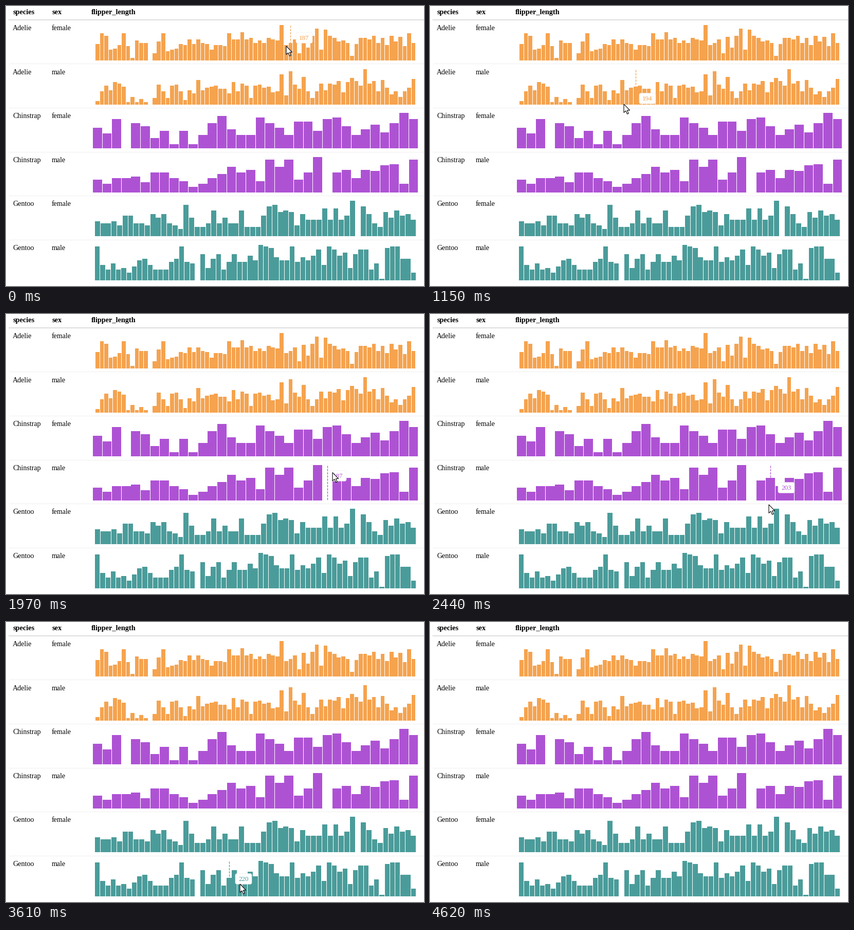
Animation, 813 px wide and 545 px high, one loop 4.68 s. Source, as a matplotlib script:

```python
import numpy as np
import matplotlib.pyplot as plt
from matplotlib.animation import FuncAnimation
from matplotlib.collections import PolyCollection
from matplotlib.patches import FancyBboxPatch, Polygon

W, H, DPI = 813, 545, 64
LOOP, INTERVAL = 4680, 30
STEPS = 69  # distinct poses per loop
PX = 72 / DPI

ORANGE, PURPLE, TEAL = "#f5a34f", "#ae52d4", "#4a9c9a"
FIRST_X, LAST_X, BAR_GAP = 177.8, 792.4, 0.9
BASE_Y, ROW_H, PLOT_H = 106, 85.6, 69
TIP_W, TIP_H = 32, 20.5

# Palmer penguins flipper lengths (mm)
adelie_female = [
    186, 195, 193, 181, 182, 185, 195, 184, 174, 189, 187, 187, 172, 178, 188,
    195, 180, 181, 182, 186, 185, 190, 186, 190, 187, 186, 181, 185, 185, 184,
    195, 190, 190, 196, 190, 191, 187, 189, 187, 191, 190, 189, 202, 185, 187,
    190, 178, 192, 183, 193, 199, 181, 198, 193, 191, 188, 189, 187, 176, 186,
    191, 191, 190, 193, 187, 191, 185, 193, 188, 192, 184, 195, 187]
adelie_male = [
    181, 190, 195, 191, 198, 197, 194, 180, 185, 180, 183, 180, 178, 184, 196,
    190, 184, 195, 196, 190, 182, 191, 188, 200, 191, 193, 194, 195, 192, 192,
    188, 198, 190, 197, 195, 184, 195, 196, 193, 194, 189, 190, 205, 186, 208,
    196, 192, 203, 190, 184, 190, 197, 191, 197, 196, 199, 189, 198, 202, 199,
    195, 210, 197, 199, 190, 200, 193, 187, 190, 185, 190, 193, 201]
chinstrap_female = [
    192, 188, 198, 178, 195, 193, 185, 190, 181, 190, 181, 187, 195, 200, 191,
    187, 187, 199, 195, 192, 187, 196, 196, 190, 198, 199, 193, 187, 191, 194,
    189, 195, 202, 198]
chinstrap_male = [
    196, 193, 197, 197, 198, 194, 201, 201, 197, 195, 191, 193, 197, 200, 205,
    201, 203, 195, 210, 205, 210, 196, 201, 212, 187, 201, 203, 197, 203, 202,
    206, 207, 193, 210]
gentoo_female = [
    211, 210, 210, 211, 209, 214, 214, 210, 210, 209, 215, 213, 215, 210, 209,
    207, 220, 213, 208, 208, 210, 217, 210, 213, 210, 210, 217, 208, 208, 208,
    214, 219, 220, 216, 217, 216, 209, 215, 212, 212, 212, 218, 212, 218, 212,
    214, 222, 203, 219, 215, 210, 208, 216, 213, 217, 214, 215, 212]
gentoo_male = [
    230, 218, 215, 219, 215, 216, 213, 217, 221, 222, 218, 215, 215, 215, 220,
    222, 230, 220, 219, 208, 225, 216, 222, 225, 215, 220, 225, 220, 220, 224,
    221, 231, 230, 229, 223, 221, 221, 230, 220, 223, 221, 224, 228, 218, 230,
    228, 224, 226, 216, 225, 228, 228, 215, 219, 209, 229, 230, 230, 222, 222,
    213]

ROWS = [
    ("Adelie", "female", ORANGE, adelie_female),
    ("Adelie", "male", ORANGE, adelie_male),
    ("Chinstrap", "female", PURPLE, chinstrap_female),
    ("Chinstrap", "male", PURPLE, chinstrap_male),
    ("Gentoo", "female", TEAL, gentoo_female),
    ("Gentoo", "male", TEAL, gentoo_male),
]

# step, x, y of the pointer tip
POINTER = np.array([
    (0, 545, 78), (4, 510, 118), (8, 475, 156), (11, 442, 158), (16, 387, 178),
    (18, 367, 204), (19, 364, 222), (20, 375, 240), (21, 403, 250),
    (22, 433, 255), (24, 490, 267), (28, 610, 297), (30, 660, 320),
    (32, 686, 341), (33, 686, 341), (36, 659, 371), (38, 629, 400),
    (41, 576, 434), (45, 497, 444), (47, 456, 452), (49, 443, 468),
    (51, 433, 488), (53, 455, 510), (55, 508, 522), (57, 564, 526),
    (59, 602, 532), (65, 735, 552)])

# step, table row, left edge and middle of the tooltip
TOOLTIP = np.array([
    (0, 0, 564, 62), (4, 0, 517, 92),
    (9, 1, 488, 162), (11, 1, 465, 173), (16, 1, 407, 180),
    (19, 2, 378, 228), (21, 2, 392, 256), (22, 2, 416, 263), (24, 2, 467, 268),
    (28, 2, 572, 270),
    (29, 3, 630, 315), (32, 3, 677, 330), (34, 3, 684, 335), (36, 3, 677, 338),
    (39, 4, 643, 394), (41, 4, 607, 404), (45, 4, 521, 420.5),
    (49, 4, 460, 431),
    (51, 5, 443, 488), (53, 5, 446, 500), (55, 5, 488, 507), (57, 5, 543, 510),
    (59, 5, 600, 512), (65, 5, 728, 512)])
TOOLTIP_END = 68

ARROW = np.array([(0, 0), (0, 16.5), (3.8, 13), (6.6, 19.3), (9.2, 18.2),
                  (6.5, 12), (11.6, 12)])


def base_y(row):
    return BASE_Y + ROW_H * row


def bar_centers(values):
    return np.linspace(FIRST_X, LAST_X, len(values))


def bar_heights(values):
    v = np.array(values)
    return (v - v.min()) / (v.max() - v.min()) * PLOT_H


def label(x, y, text, **style):
    return ax.text(x, y, text, family="Liberation Serif",
                   **{"fontsize": 14 * PX, "color": "black", **style})


def draw_row(row, species, sex, color, values):
    base = base_y(row)
    centers, heights = bar_centers(values), bar_heights(values)
    half = (centers[1] - centers[0] - BAR_GAP) / 2
    bars = [[(x - half, base), (x - half, base - h), (x + half, base - h),
             (x + half, base)] for x, h in zip(centers, heights) if h > 0]
    ax.add_collection(PolyCollection(bars, facecolor=color, linewidth=0),
                      autolim=False)
    label(13, base - 59, species)
    label(89, base - 59, sex)
    if row < len(ROWS) - 1:
        y = round(base + 6.5) - 0.5
        ax.plot([6, 812], [y, y], color="#efefef", lw=PX)


fig = plt.figure(figsize=(W / DPI, H / DPI), dpi=DPI, facecolor="white")
ax = fig.add_axes([0, 0, 1, 1])
ax.set_xlim(0, W)
ax.set_ylim(H, 0)
ax.axis("off")

for x, name in ((13, "species"), (89, "sex"), (166, "flipper_length")):
    label(x, 16, name, weight="bold", fontsize=14.2 * PX)
ax.plot([6, 812], [27, 27], color="#dedede", lw=2 * PX)
for row, spec in enumerate(ROWS):
    draw_row(row, *spec)

guide, = ax.plot([], [], lw=1.3 * PX, dashes=(3.2, 1.6),
                 dash_capstyle="butt", zorder=4)
tip_box = FancyBboxPatch((0, 0), TIP_W, TIP_H,
                         boxstyle="round,pad=0,rounding_size=3",
                         facecolor="white", edgecolor="#ececec",
                         lw=0.6 * PX, zorder=5)
ax.add_patch(tip_box)
tip_text = label(0, 0, "", fontsize=13 * PX, ha="center", zorder=6)
pointer = Polygon(ARROW, closed=True, facecolor="white", edgecolor="black",
                  lw=1.1 * PX, joinstyle="miter", zorder=7)
ax.add_patch(pointer)


def place_tooltip(step):
    row = int(TOOLTIP[TOOLTIP[:, 0] <= step][-1, 1])
    keys = TOOLTIP[TOOLTIP[:, 1] == row]
    left = np.interp(step, keys[:, 0], keys[:, 2])
    middle = np.interp(step, keys[:, 0], keys[:, 3])

    color, values = ROWS[row][2:]
    centers = bar_centers(values)
    hit = int(np.argmin(abs(centers - (left - 9))))
    base = base_y(row)
    guide.set_data([centers[hit]] * 2,
                   [base - PLOT_H + 1, base - bar_heights(values)[hit]])
    guide.set_color(color)
    tip_box.set_bounds(left, middle - TIP_H / 2, TIP_W, TIP_H)
    tip_text.set_position((left + 15.7, middle + 4.3))
    tip_text.set_text(str(values[hit]))
    tip_text.set_color(color)


def update(frame):
    step = int(frame * INTERVAL * STEPS / LOOP + 0.4)
    shown = step < TOOLTIP_END
    for artist in (guide, tip_box, tip_text, pointer):
        artist.set_visible(shown)
    if shown:
        place_tooltip(step)
        tip = [np.interp(step, POINTER[:, 0], POINTER[:, i]) for i in (1, 2)]
        pointer.set_xy(ARROW + tip)
    return guide, tip_box, tip_text, pointer


anim = FuncAnimation(fig, update, frames=LOOP // INTERVAL, interval=INTERVAL,
                     repeat=True, repeat_delay=0, blit=False)
plt.show()
```
